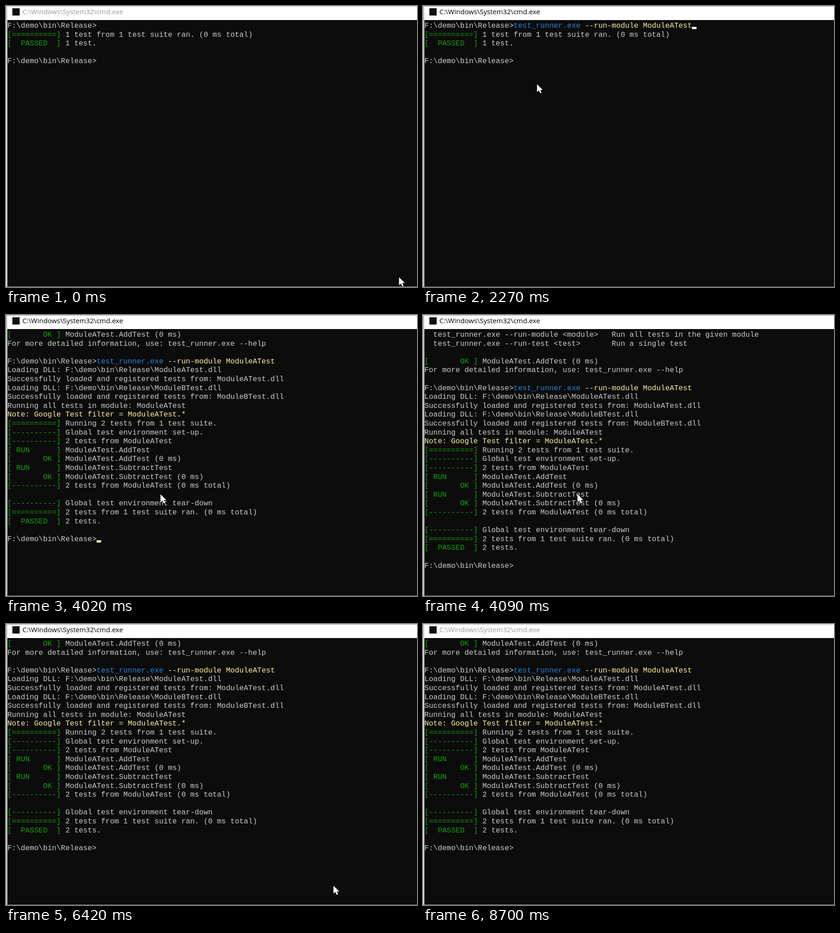
Animation of 903 by 620 pixels, one loop 8770 ms. Source, as an HTML page with a canvas:

```html
<!DOCTYPE html>
<html lang="en">
<head>
<meta charset="utf-8">
<title>Test runner console</title>
<style>
  html, body { margin: 0; width: 100%; height: 100%; overflow: hidden; background: #0c0c0c; }
  canvas { display: block; }
</style>
</head>
<body>
<canvas id="stage" width="903" height="620"></canvas>
<script>
const ctx = document.getElementById('stage').getContext('2d');
const LOOP = 8770, COL = 9.8, ROW = 19.6, LEFT = 3, BASE = 48, STEP = 68;
const GREY = '#cccccc', GREEN = '#13a10e', BLUE = '#2a82da', YELLOW = '#f9f1a5';

const PROMPT = 'F:\\demo\\bin\\Release>';
const PROGRAM = 'test_runner.exe';
const OPTION = ' --run-module';
const COMMAND = PROGRAM + OPTION + ' ModuleATest';
const TITLE = 'C:\\Windows\\System32\\cmd.exe';

const DOUBLE = '[==========] ', SINGLE = '[----------] ';
const RUN = '[ RUN      ] ', OK = '[       OK ] ', PASSED = '[  PASSED  ] ';
const loading = name => [
  `Loading DLL: F:\\demo\\bin\\Release\\${name}.dll`,
  `Successfully loaded and registered tests from: ${name}.dll`
];
const testCase = name => [RUN + name, OK + name + ' (0 ms)'];

// Rows are counted from the prompt where the command is entered.
const history = [
  '  test_runner.exe --run-module <module>   Run all tests in the given module',
  '  test_runner.exe --run-test <test>       Run a single test',
  '',
  OK + 'ModuleATest.AddTest (0 ms)',
  'For more detailed information, use: test_runner.exe --help',
  ''
];
const before = [
  DOUBLE + '1 test from 1 test suite ran. (0 ms total)',
  PASSED + '1 test.',
  '',
  PROMPT
];
const after = [
  ...loading('ModuleATest'),
  ...loading('ModuleBTest'),
  'Running all tests in module: ModuleATest',
  'Note: Google Test filter = ModuleATest.*',
  DOUBLE + 'Running 2 tests from 1 test suite.',
  SINGLE + 'Global test environment set-up.',
  SINGLE + '2 tests from ModuleATest',
  ...testCase('ModuleATest.AddTest'),
  ...testCase('ModuleATest.SubtractTest'),
  SINGLE + '2 tests from ModuleATest (0 ms total)',
  '',
  SINGLE + 'Global test environment tear-down',
  DOUBLE + '2 tests from 1 test suite ran. (0 ms total)',
  PASSED + '2 tests.',
  '',
  PROMPT
];

const caretTimes = [
  [950, 1740], [2270, 3350], [3820, 4090], [5410, 5940],
  [6470, 7040], [7570, 8100], [8630, 8700]
];
const mouseMoves = [
  { start: 70, steps: 11, to: [250, 172], ease: p => p * p * (3 - 2 * p) },
  { start: 3680, steps: 3, to: [339, 395], ease: p => p },
  { start: 6210, steps: 4, to: [719, 577], ease: p => p },
  { start: 6490, steps: 4, to: [800, 622], ease: p => p }
];
const arrow = new Path2D('M.5 .5V18L4.6 14.2 7.6 20.5 10.6 19.2 7.8 13.2H13.2Z');

function rect(x, y, w, h, color) {
  ctx.fillStyle = color;
  ctx.fillRect(x, y, w, h);
}

function print(row, col, text, color = GREY) {
  ctx.fillStyle = color;
  ctx.fillText(text, LEFT + col * COL, BASE + row * ROW);
}

function printLine(row, line) {
  if (row < 0) return;
  if (line[0] === '[') {
    print(row, 0, line.slice(0, 12), GREEN);
    print(row, 13, line.slice(13));
  } else {
    print(row, 0, line, line.startsWith('Note') ? YELLOW : GREY);
  }
}

function typedText(t) {
  if (t < 950) return '';
  if (t < 1080) return PROGRAM;
  if (t < 1210) return PROGRAM + OPTION;
  return COMMAND;
}

function drawConsole(t) {
  const done = t >= 2730;
  const scroll = t < 4020 ? 0 : t >= 4090 && t < 4550 ? 6 : 3;
  const typed = typedText(t);
  ctx.font = '16.333px "Liberation Mono", monospace';
  history.forEach((line, i) => printLine(i - history.length + scroll, line));
  print(scroll, 0, PROMPT);
  print(scroll, PROMPT.length, typed.slice(0, PROGRAM.length), BLUE);
  print(scroll, PROMPT.length + PROGRAM.length, typed.slice(PROGRAM.length), YELLOW);
  (done ? after : before).forEach((line, i) => printLine(scroll + 1 + i, line));

  if (caretTimes.some(([on, off]) => t >= on && t < off)) {
    const row = scroll + (done ? after.length : 0);
    const col = PROMPT.length + (done ? 0 : typed.length);
    rect(Math.round(LEFT + col * COL), Math.round(BASE - 2 + row * ROW), 10, 5,
      t < 2800 ? '#ffffff' : YELLOW);
  }
}

function drawWindow(t) {
  const active = t >= 740 && t < 8700;
  const border = active ? '#8a8a8a' : '#aaaaaa';
  rect(0, 0, 903, 620, '#0c0c0c');
  rect(0, 0, 903, 31, '#ffffff');
  rect(0, 0, 3, 620, '#e8e8e8');
  rect(1, 0, 902, 1, border);
  rect(1, 0, 1, 620, border);
  rect(1, 619, 902, 1, border);
  rect(14, 5, 16, 16, '#101010');
  ctx.font = '15.1px "Open Sans", sans-serif';
  ctx.fillStyle = active ? '#000000' : '#999999';
  const running = t >= 2670 && t < 2730;
  ctx.fillText(running ? `${TITLE} - ${COMMAND}` : TITLE, 36, 18);
}

function drawMouse(t) {
  let [x, y] = [863, 598];
  for (const { start, steps, to, ease } of mouseMoves) {
    if (t < start) break;
    const p = ease(Math.min(1, (Math.floor((t - start) / STEP) + 1) / steps));
    x += (to[0] - x) * p;
    y += (to[1] - y) * p;
  }
  ctx.save();
  ctx.translate(Math.round(x), Math.round(y));
  ctx.fillStyle = '#ffffff';
  ctx.strokeStyle = '#000000';
  ctx.stroke(arrow);
  ctx.fill(arrow);
  ctx.restore();
}

const began = performance.now();
function frame() {
  const t = (performance.now() - began) % LOOP;
  drawWindow(t);
  drawConsole(t);
  drawMouse(t);
  requestAnimationFrame(frame);
}
frame();
</script>
</body>
</html>
```
